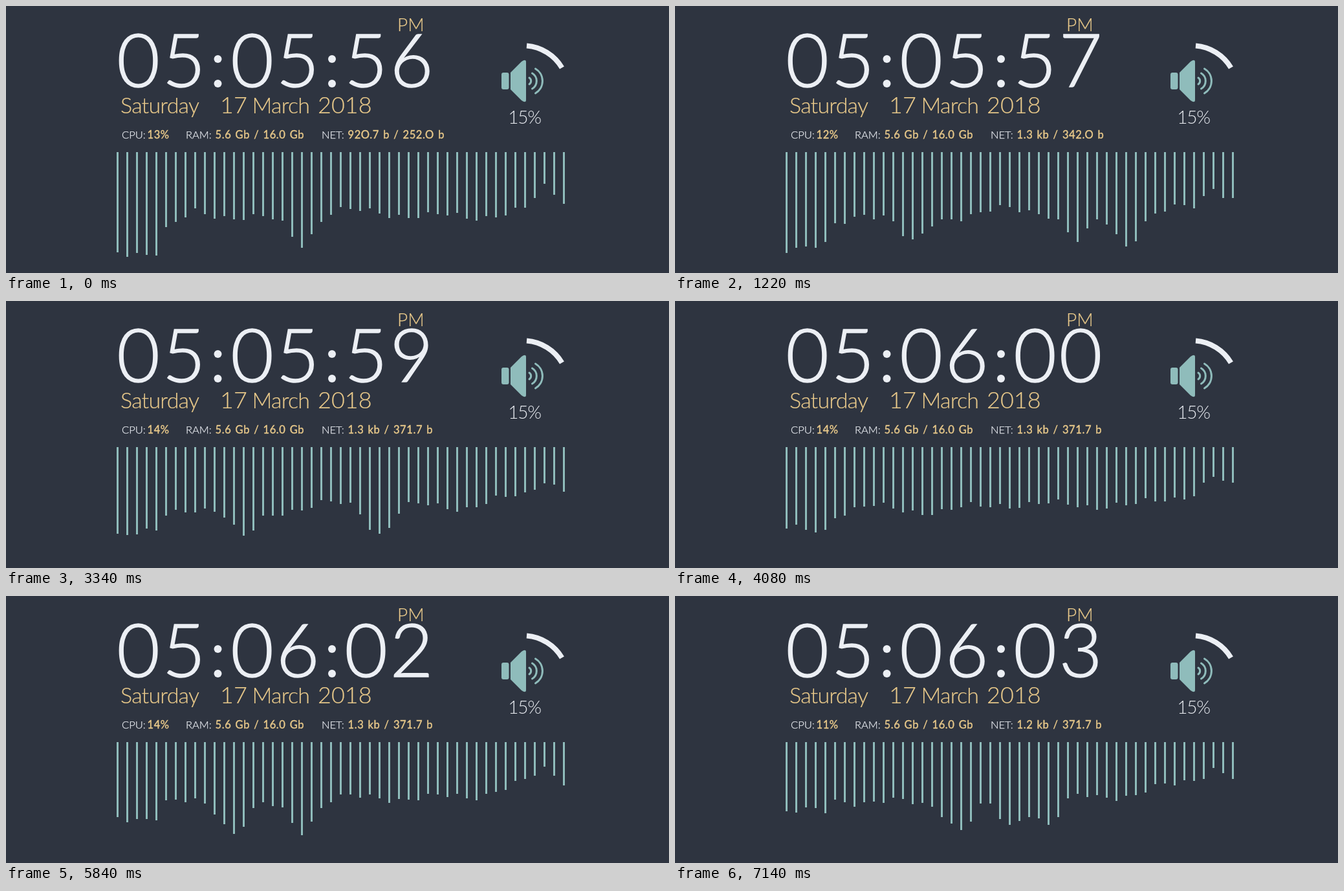
Recreate the animation shown at these times as an HTML page. Size 1025 by 413 pixels, loop 7.17 s.

```html
<!DOCTYPE html>
<html lang="en">
<head>
<meta charset="utf-8">
<title>Desktop clock</title>
<style>
  html, body { margin: 0; width: 100%; height: 100%; overflow: hidden; background: #2e3440; }
  svg { display: block; width: 100vw; height: 100vh; }
  text { font-family: Lato, sans-serif; font-weight: 300; fill: #eceff4; white-space: pre; }
  .clock { fill: #eceff4; }
  .clock text { font-size: 115px; text-anchor: middle; stroke: #eceff4; stroke-width: 1.6; }
  .date text { font-size: 34px; letter-spacing: -0.8px; fill: #ebcb8b; stroke: #ebcb8b; stroke-width: 0.2; }
  .date .number { font-size: 36px; letter-spacing: 0; }
  .date .period { font-size: 28px; letter-spacing: 0; }
  .stats text { font-size: 16.5px; stroke: #eceff4; stroke-width: 0.25; }
  .stats .value { font-weight: 400; fill: #ebcb8b; stroke: #ebcb8b; stroke-width: 0.4; letter-spacing: 0.6px; word-spacing: 1.4px; }
  .accent { fill: #8fbcbb; }
  .line { fill: none; stroke: #8fbcbb; stroke-width: 3; }
</style>
</head>
<body>
<svg viewBox="0 0 1025 413">
  <clipPath id="netClip"><rect x="480" y="185" width="197" height="30"/></clipPath>

  <g class="clock" id="clock">
    <circle cx="327.5" cy="82" r="6"/><circle cx="327.5" cy="120" r="6"/>
    <circle cx="504" cy="82" r="6"/><circle cx="504" cy="120" r="6"/>
  </g>

  <g class="date">
    <text class="period" x="605" y="39">PM</text>
    <text x="177" y="166">Saturday</text>
    <text class="number" x="331" y="166">17</text>
    <text x="380.5" y="166">March</text>
    <text class="number" x="482" y="166">2018</text>
  </g>

  <g class="stats">
    <text x="179" y="205">CPU:</text>
    <text class="value" id="cpu" x="218.5" y="205"></text>
    <text x="278" y="205">RAM:</text>
    <text class="value" x="323.5" y="205">5.6 Gb / 16.0 Gb</text>
    <text x="488" y="205">NET:</text>
    <text class="value" id="net" x="528.5" y="205" clip-path="url(#netClip)"></text>
  </g>

  <g class="volume">
    <path d="M805 61.5A70 70 0 0 1 859.5 95.5" fill="none" stroke="#eceff4" stroke-width="8"/>
    <rect class="accent" x="766" y="103" width="11.5" height="26" rx="3"/>
    <path class="accent" d="M780 103L797 86Q804 81 804 87V145Q804 151 797 146L780 129Z"/>
    <path class="line" stroke-linecap="round"
      d="M809 111A6 6 0 0 1 809 121M813.5 104A14 14 0 0 1 813.5 128M818.5 97A22 22 0 0 1 818.5 135"/>
    <text x="801.5" y="182" font-size="28" letter-spacing="-1.2" text-anchor="middle">15%</text>
  </g>

  <path class="line" id="bars" shape-rendering="crispEdges"/>
</svg>

<script>
const LOOP = 7170;
const STEP = 46.2;                          // the spectrum refreshes at this interval
const FIRST_TICK = 800;                     // first change of the seconds
const START_SECONDS = (5 * 60 + 5) * 60 + 56;
const BAR_COUNT = 47, BAR_GAP = 15, BAR_LEFT = 172.5, BAR_TOP = 226;

const cpuLoad = ["13%", "12%", "15%", "14%", "14%", "14%", "14%", "11%"];
const netLoad = ["92O.7 b / 252.O b", "1.3 kb / 342.O b", "1.1 kb / 324.O b", "1.3 kb / 371.7 b",
                 "1.3 kb / 371.7 b", "1.3 kb / 353.7 b", "1.3 kb / 371.7 b", "1.2 kb / 371.7 b"];

// Spectrum outline: bar, its length at the start and at the end of the loop.
const outline = [[0, 155, 108], [4, 155, 108], [5, 121, 90], [8, 94, 92], [16, 104, 96],
                 [22, 90, 86], [36, 102, 82], [42, 90, 56], [44, 56, 40], [46, 74, 56]];
// Moments of the music and the bars that surge around them.
const surges = [[0, [19]], [1220, [13, 30, 35]], [2140, [21, 27]], [3340, [13, 27]],
                [4870, [12, 19]], [5840, [12, 19]], [7140, [18, 23, 27]]];
const SURGE = { height: 44, bars: 1.2, time: 260 };

const byId = id => document.getElementById(id);
const mix = (a, b, u) => a + (b - a) * u;
const bell = x => Math.exp(-x * x / 2);
const pad = n => String(n).padStart(2, "0");

const digits = Array.from({ length: 6 }, (_, i) => {
  const digit = document.createElementNS("http://www.w3.org/2000/svg", "text");
  digit.setAttribute("x", 204.5 + 176 * Math.floor(i / 2) + 70.5 * (i % 2));
  digit.setAttribute("y", 125);
  byId("clock").append(digit);
  return digit;
});

function outlineAt(bar, progress) {
  const k = Math.max(1, outline.findIndex(([knot]) => knot >= bar));
  const [left, leftStart, leftEnd] = outline[k - 1];
  const [right, rightStart, rightEnd] = outline[k];
  const u = (bar - left) / (right - left);
  return mix(mix(leftStart, rightStart, u), mix(leftEnd, rightEnd, u), progress);
}

function surgeAt(bar, t) {
  let sum = 0;
  for (const [moment, peaks] of surges) {
    const strength = SURGE.height * bell((t - moment) / SURGE.time);
    for (const peak of peaks) sum += strength * bell((bar - peak) / SURGE.bars);
  }
  return sum;
}

function drawBars(t) {
  const step = Math.floor((t + 16) / STEP);
  let path = "";
  for (let bar = 0; bar < BAR_COUNT; bar++) {
    const flicker = 5 * Math.sin(bar * 0.7 + step * 0.55) + 4 * Math.sin(bar * 2.1 - step * 0.9);
    const length = outlineAt(bar, t / LOOP) + surgeAt(bar, step * STEP) + flicker;
    path += `M${BAR_LEFT + bar * BAR_GAP} ${BAR_TOP}v${Math.round(length)}`;
  }
  byId("bars").setAttribute("d", path);
}

function drawReadings(t) {
  const tick = Math.max(0, Math.floor((t - FIRST_TICK) / 1000) + 1);
  const seconds = START_SECONDS + tick;
  const time = [seconds / 3600, seconds / 60 % 60, seconds % 60].map(n => pad(Math.floor(n))).join("");
  digits.forEach((digit, i) => digit.textContent = time[i]);
  byId("cpu").textContent = cpuLoad[tick];
  byId("net").textContent = netLoad[tick];
}

function draw() {
  const t = performance.now() % LOOP;
  drawReadings(t);
  drawBars(t);
  requestAnimationFrame(draw);
}
draw();
</script>
</body>
</html>
```
